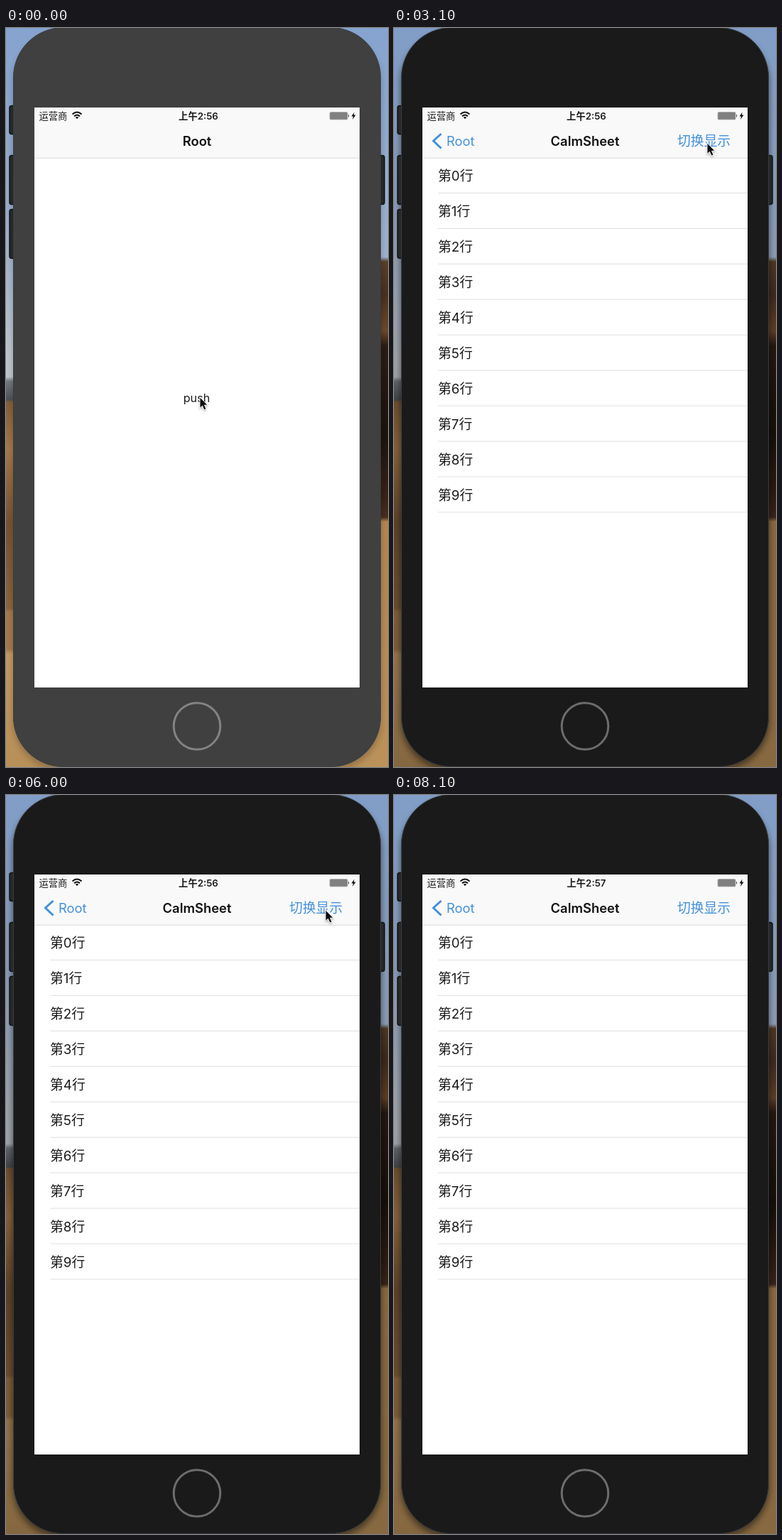
Write an HTML page that moves like this. It is 538 px wide and 1041 px high and loops after 8.2 s.

```html
<!DOCTYPE html>
<html lang="zh-CN">
<head>
<meta charset="utf-8">
<title>Table refresh demo</title>
<style>
html, body { margin: 0; width: 100%; height: 100%; overflow: hidden; background: #8ba7d0; }
svg { display: block; width: 100%; height: 100%; }
text { font-family: Inter, "Noto Sans CJK SC", "Noto Sans CJK", sans-serif; font-size: 18.8px; fill: #1c1c1c; }
.mid { text-anchor: middle; }
.semi { font-weight: 600; }
.title { font-size: 18.4px; fill: #111; }
.status { font-size: 13.3px; }
.note { font-size: 15.5px; font-weight: 500; fill: #5c5c5c; }
.link { fill: #4390dc; }
</style>
</head>
<body>
<svg viewBox="0 0 538 1041" preserveAspectRatio="none">
  <defs>
    <linearGradient id="left" x2="0" y2="1">
      <stop offset="0" stop-color="#86a4d0"/><stop offset=".25" stop-color="#9aaecb"/>
      <stop offset=".45" stop-color="#c3c9d1"/><stop offset=".472" stop-color="#c3c9d1"/>
      <stop offset=".478" stop-color="#777b82"/><stop offset=".503" stop-color="#50545a"/>
      <stop offset=".506" stop-color="#85613a"/><stop offset=".57" stop-color="#a87b4b"/>
      <stop offset=".67" stop-color="#795634"/><stop offset=".785" stop-color="#8e673e"/>
      <stop offset=".79" stop-color="#a77d4d"/><stop offset=".84" stop-color="#a77d4d"/>
      <stop offset=".847" stop-color="#c79d65"/><stop offset="1" stop-color="#bd935b"/>
    </linearGradient>
    <linearGradient id="right" x2="0" y2="1">
      <stop offset="0" stop-color="#86a4d0"/><stop offset=".31" stop-color="#a1b5d0"/>
      <stop offset=".316" stop-color="#5b4029"/><stop offset=".36" stop-color="#49311f"/>
      <stop offset=".41" stop-color="#70492b"/><stop offset=".43" stop-color="#2c1d13"/>
      <stop offset=".55" stop-color="#1c130e"/><stop offset=".63" stop-color="#382317"/>
      <stop offset=".662" stop-color="#4a2f1d"/><stop offset=".668" stop-color="#b78952"/>
      <stop offset="1" stop-color="#c1965d"/>
    </linearGradient>
    <linearGradient id="dim" x2="0" y2="1">
      <stop offset="0" stop-opacity=".04"/><stop offset=".5" stop-opacity=".2"/><stop offset="1" stop-opacity=".3"/>
    </linearGradient>
    <radialGradient id="eye">
      <stop offset=".76"/><stop offset=".87" stop-color="#555"/><stop offset="1" stop-color="#bbb"/>
    </radialGradient>
    <filter id="soft" x="-10%" y="-10%" width="120%" height="120%"><feGaussianBlur stdDeviation="4"/></filter>
    <filter id="drop" x="-50%" y="-50%" width="200%" height="200%">
      <feDropShadow dx="0" dy="1.5" stdDeviation="1.5" flood-opacity=".35"/>
    </filter>
    <clipPath id="screen"><rect x="40" y="112" width="458" height="817"/></clipPath>
  </defs>

  <rect width="269" height="1041" fill="url(#left)"/>
  <rect x="269" width="269" height="1041" fill="url(#right)"/>
  <rect id="shade" width="538" height="1041" fill="url(#dim)"/>
  <rect id="shadow" x="9" y="6" width="520" height="1041" rx="72" filter="url(#soft)"/>

  <g fill="#262829" stroke="#121314" stroke-width="1.5">
    <rect x="5" y="109.500" width="12" height="40" rx="3"/>
    <rect x="5" y="179.500" width="12" height="69" rx="3"/>
    <rect x="5" y="255.500" width="12" height="69" rx="3"/>
    <rect x="521" y="179.500" width="12" height="69" rx="3"/>
  </g>
  <rect id="body" x="10.500" y="-.5" width="517" height="1041" rx="70" stroke="#383d42"/>
  <circle id="home" cx="269" cy="983.500" r="32.800" fill="none" stroke-width="3"/>

  <g clip-path="url(#screen)">
    <rect x="40" y="112" width="458" height="817" fill="#fff"/>
    <g id="rootPage"><text id="push" class="mid" x="268.500" y="526.500" style="font-size:16.200px"></text></g>
    <g id="tablePage">
      <rect x="40" y="183" width="458" height="746" fill="#fff"/>
      <g id="scroll">
        <g id="header">
          <text class="note mid" x="269" y="144">正在刷新数据中...</text>
          <text id="updated" class="note mid" x="269" y="174"></text>
          <g id="spinner" transform="translate(162 153)" stroke="#777" stroke-width="2" stroke-linecap="round"></g>
        </g>
        <g id="list"></g>
        <g id="empty">
          <path d="M249 536C252 521 264 519 274 521C284 524 287 520 286 513C292 519 294 525 289 530C294 530 292 535 290 537C280 540 270 528 249 536Z" fill="#929292"/>
          <path d="M249 535C252 520 264 519 274 521C284 524 287 520 286 513C292 520 292 528 284 531C272 533 264 525 249 535Z" fill="#5d5d5d"/>
          <ellipse cx="269" cy="580" rx="55.500" ry="49" fill="#e0e0e0"/>
          <g fill="url(#eye)">
            <ellipse cx="240" cy="566" rx="14" ry="17" transform="rotate(12 240 566)"/>
            <ellipse cx="296" cy="566" rx="14" ry="17" transform="rotate(-12 296 566)"/>
          </g>
          <g fill="#fff">
            <circle cx="244.500" cy="563" r="4"/><circle cx="239.500" cy="571" r="1.500"/>
            <circle cx="299.500" cy="563" r="4"/><circle cx="295" cy="571" r="1.500"/>
          </g>
          <g fill="#a2a2a2">
            <ellipse cx="227" cy="586.500" rx="6" ry="3"/><ellipse cx="311" cy="586" rx="6" ry="3"/>
            <path d="M256 595.500L265 581L277 596L266 591.500Z"/>
          </g>
          <g id="feet" fill="#e3e3e3" stroke="#c4c4c4"></g>
          <text class="mid" x="269" y="670.500" style="font-size:18px;fill:#626262">暂无数据，点击重试</text>
        </g>
      </g>
    </g>

    <rect x="40" y="112" width="458" height="71" fill="#f9f9f9"/>
    <rect x="40" y="182.700" width="458" height="1" fill="#d9d9d9"/>
    <text class="status" x="46.500" y="128.700">运营商</text>
    <g fill="none" stroke="#111" stroke-width="2">
      <path d="M93.500 121.500Q100 115.500 106.500 121.500M96 124.300Q100 120.700 104 124.300"/>
      <path d="M97.800 125.800Q100 124.200 102.200 125.800L100 128.300Z" fill="#111" stroke="none"/>
    </g>
    <text id="clock" class="status semi mid" x="271" y="128.700"></text>
    <rect x="456" y="118.500" width="25" height="10.500" rx="1.500" fill="#808080" stroke="#aaa" stroke-width=".8"/>
    <path d="M482 121.500q2 2.200 0 4.500z" fill="#333"/>
    <path d="M490.500 118.500L486.500 124.500H489L488 129L492.500 122.500H489.800Z" fill="#111"/>

    <text id="rootTitle" class="title semi mid" x="269" y="165.500">Root</text>
    <g id="tableNav">
      <path d="M66.500 149L55.500 159L66.500 169.500" fill="none" stroke="#4390dc" stroke-width="3"/>
      <text class="link" x="74" y="165.500" style="font-size:18.300px">Root</text>
      <text id="tableTitle" class="title semi mid" y="165.500">CalmSheet</text>
      <text id="toggle" class="link" x="399" y="165.800">切换显示</text>
    </g>
  </g>

  <path id="cursor" d="M0 0V15.500L3.500 12.300L6 18L9 16.700L6.500 11.200H11Z" fill="#0a0a0a" stroke="#fff" stroke-width=".9" filter="url(#drop)"/>
</svg>
<script>
const LOOP = 8200, STEP = 100;
const $ = id => document.getElementById(id);
const ease = (t, a, b) => {
  const p = Math.min(1, Math.max(0, (t - a) / (b - a)));
  return p * p * (3 - 2 * p);
};
const within = (t, spans) => spans.some(([a, b]) => t >= a && t < b);
const set = (id, attrs) => {
  for (const k in attrs) $(id).setAttribute(k, attrs[k]);
};
const show = (id, on) => set(id, { visibility: on ? "visible" : "hidden" });
const move = (id, x, y) => set(id, { transform: `translate(${x} ${y})` });

// Each refresh: header opens, data arrives as it closes
const REFRESHES = [[1200, 2400], [3800, 5100], [7200, 7700]];
const LISTS = [[2400, 3300], [5100, 6900], [7700, LOOP]];
const EMPTIES = [[3300, 5100], [6900, 7700]];
const TAPS = [[3200, 3400], [3700, 3800], [6900, 7100]];
// Pointer moves: start, end, x, y
const POINTER = [[900, 1300, 441, 162], [5300, 5600, 450, 162], [7400, 7800, 478, -40]];

$("list").innerHTML = Array.from({ length: 10 }, (_, i) => {
  const y = 183 + i * 49.95;
  return `<text x="62" y="${y + 32}">第${i}行</text>
    <rect x="62" y="${y + 49}" width="436" height="1" fill="#e0e0e0"/>`;
}).join("");
$("spinner").innerHTML = Array.from({ length: 12 }, (_, i) =>
  `<path d="M0 -6V-10" transform="rotate(${i * 30})"/>`).join("");
$("feet").innerHTML = [243, 293].map(x =>
  `<ellipse cx="${x}" cy="617.500" rx="10" ry="9.500"/>
   <path d="M${x - 5} 620q-1 4 1 6M${x + 4} 620q1 4 -1 6" fill="none" stroke="#858585" stroke-width="1.300"/>`).join("");
const spokes = [...$("spinner").children];

function render(t) {
  const active = t >= 500;
  set("body", { fill: active ? "#1a1a1a" : "#404040" });
  set("home", { stroke: active ? "#6d6d6d" : "#838383" });
  set("shade", { opacity: active ? 1 : 0.1 });
  set("shadow", { opacity: active ? 0.45 : 0.2 });

  const slide = ease(t, 700, 1100);
  move("rootPage", -137 * slide, 0);
  move("tablePage", 458 * (1 - slide), 0);
  set("push", { fill: active ? "#4390dc" : "#6791b3", opacity: within(t, [[600, 800]]) ? 0.25 : 1 });
  set("rootTitle", { opacity: 1 - slide });
  set("tableNav", { opacity: slide });
  set("tableTitle", { x: 269 + 180 * (1 - slide) });
  set("toggle", { opacity: within(t, TAPS) ? 0.25 : 1 });

  const pull = REFRESHES.reduce((sum, [open, close]) =>
    sum + ease(t, open, open + 200) - ease(t, close, close + 300), 0);
  move("scroll", 0, 60 * pull);
  show("header", pull > 0);
  show("list", within(t, LISTS));
  show("empty", within(t, EMPTIES));
  $("updated").textContent = "最后更新：今天 " + (t < 2400 ? "02:50" : "02:56");
  $("clock").textContent = "上午" + (t < 6500 ? "2:56" : "2:57");

  const head = (Math.floor(t / STEP) + 11) % 12;
  spokes.forEach((s, i) => s.setAttribute("opacity", 1 - ((head - i + 12) % 12) / 11 * 0.8));

  let x = 273, y = 520;
  for (const [a, b, tx, ty] of POINTER) {
    const p = ease(t, a, b);
    x += (tx - x) * p;
    y += (ty - y) * p;
  }
  move("cursor", x, y);
}

$("push").textContent = "push";
const start = performance.now();
function tick() {
  const t = (performance.now() - start) % LOOP;
  render(Math.floor(t / STEP) * STEP);
  requestAnimationFrame(tick);
}
tick();
</script>
</body>
</html>
```
